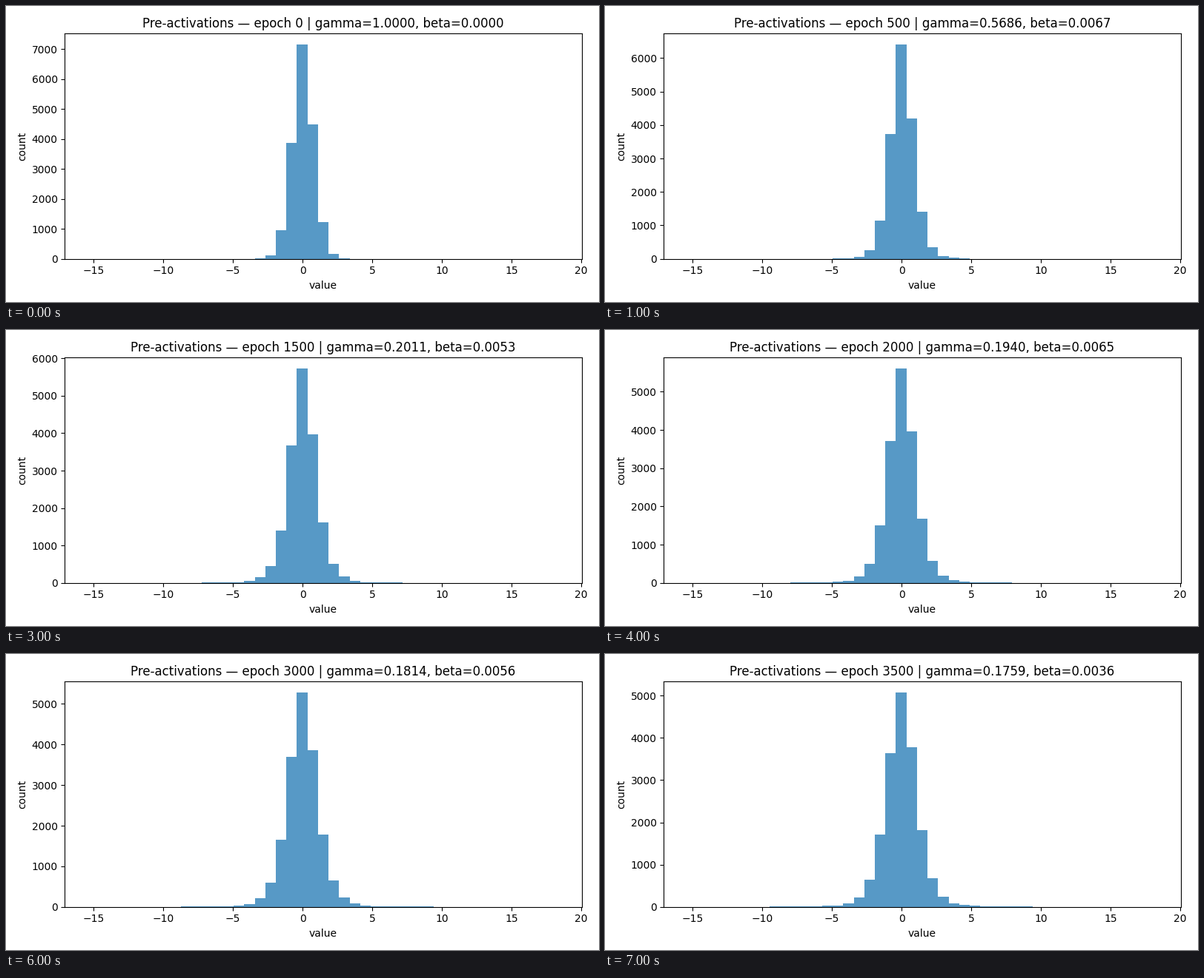
Write a matplotlib script that moves like this. It is 800 by 400 pixels and loops after 8 s.

```python
import numpy as np
import matplotlib.pyplot as plt
from matplotlib.animation import FuncAnimation

LOW, HIGH, BINS = -17.045, 20.02, 49
PEAK_BIN = 22
EPOCH_STEP = 500

# Key points of the training run, joined by straight lines
KEY_STEPS = [0, 1, 2, 3, 5, 7]
GAMMA = [1.0, 0.5686, 0.2805, 0.2011, 0.1869, 0.1759]
BETA = [0.0, 0.0067, 0.0052, 0.0053, 0.0076, 0.0036]
PEAK = [7160, 6409, 6259, 5733, 5492, 5079]


def at(step, keys):
    return np.interp(step, KEY_STEPS, keys)


def bell(x, sigma):
    return np.exp(-0.5 * (x / sigma) ** 2)


def bin_counts(step):
    """Narrow core with a shoulder and a wide tail that grow over time."""
    x = np.arange(BINS) - PEAK_BIN
    shoulder = 1200 * (1 - np.exp(-step / 2))
    tail = 7 * step
    core = at(step, PEAK) - shoulder - tail
    sharpness = 0.54 - 0.022 * step
    skew = 0.16 * np.exp(-step / 5)
    counts = (core * np.exp(-sharpness * np.abs(x) ** 1.8)
              + shoulder * bell(x, 2) + tail * bell(x, 5.5))
    return counts * np.exp(skew * np.tanh(x / 2))


fig, ax = plt.subplots(figsize=(8, 4), dpi=100)
edges = np.linspace(LOW, HIGH, BINS + 1)
bars = ax.bar(edges[:-1], np.zeros(BINS), width=np.diff(edges), align="edge",
              color="C0", alpha=0.75)
ax.set_xlim(LOW, HIGH)
ax.set_xlabel("value")
ax.set_ylabel("count")


def draw(step):
    counts = bin_counts(step)
    for bar, count in zip(bars, counts):
        bar.set_height(count)
    ax.set_ylim(0, 1.05 * counts.max())
    ax.set_title(f"Pre-activations — epoch {step * EPOCH_STEP} | "
                 f"gamma={at(step, GAMMA):.4f}, beta={at(step, BETA):.4f}")
    return bars


draw(0)
fig.tight_layout()
anim = FuncAnimation(fig, draw, frames=8, interval=1000, repeat=True,
                     repeat_delay=0, init_func=lambda: draw(0))
plt.show()
```
